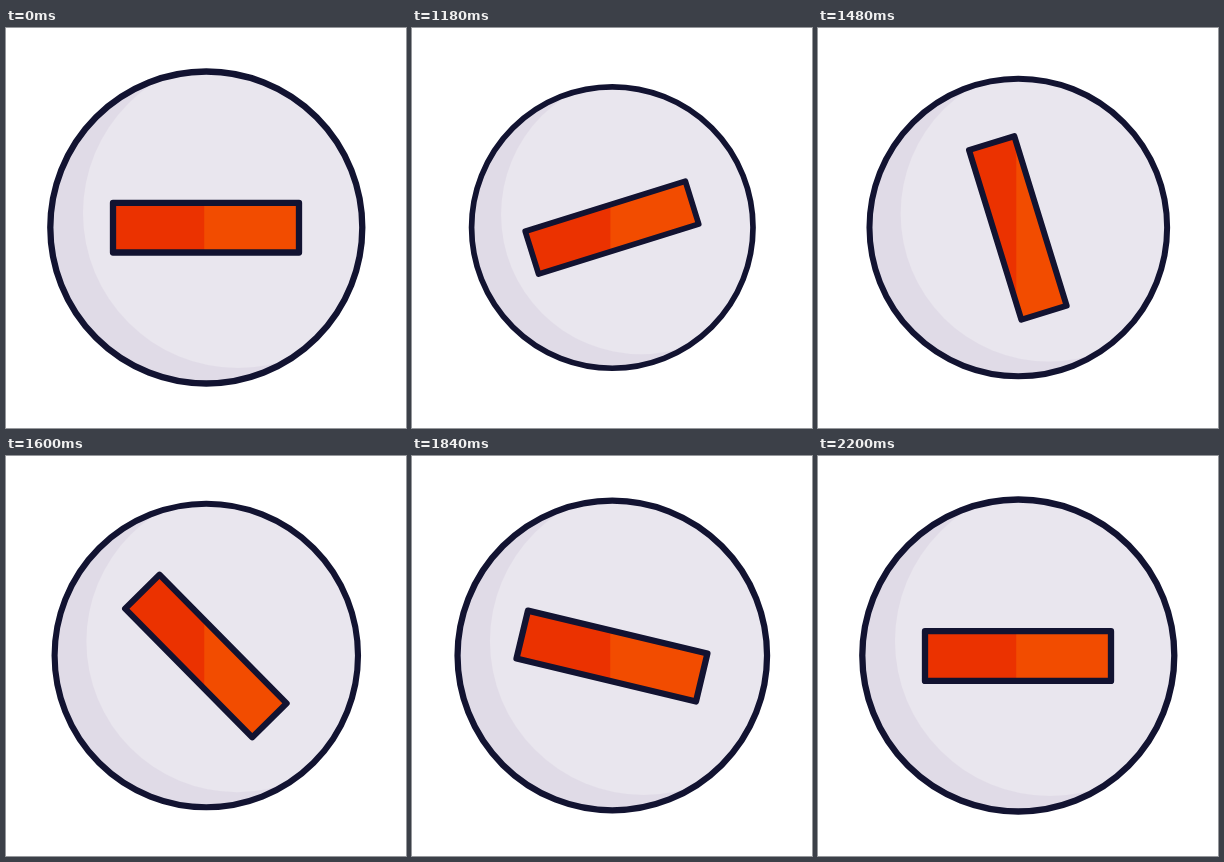
An HTML page that plays this animation: 400 px wide and 400 px high, repeating every 2230 ms.

```html
<!DOCTYPE html>
<html lang="en">
<head>
<meta charset="utf-8">
<title>Minus button</title>
<style>
  html, body { margin: 0; width: 100%; height: 100%; overflow: hidden; background: #fff; }
  svg { display: block; width: 100vw; height: 100vh; }
  .line { fill: none; stroke: #121331; stroke-width: 6.3; stroke-linejoin: round; }
</style>
</head>
<body>
<svg viewBox="0 0 400 400">
  <defs>
    <clipPath id="disc"><circle cx="200.3" cy="199.5" r="156"/></clipPath>
    <clipPath id="bar"><rect class="spin" x="107" y="174.8" width="186" height="49.7"/></clipPath>
  </defs>
  <g id="icon">
    <g clip-path="url(#disc)">
      <rect width="400" height="400" fill="#e0dbe7"/>
      <circle cx="232" cy="185" r="155" fill="#e9e6ee"/>
    </g>
    <circle class="line" cx="200.3" cy="199.5" r="156"/>
    <g clip-path="url(#bar)">
      <rect width="400" height="400" fill="#f24c00"/>
      <rect width="198.2" height="400" fill="#eb3200"/>
    </g>
    <rect class="line spin" x="107" y="174.8" width="186" height="49.7"/>
  </g>
</svg>
<script>
  const LOOP = 2230, START = 1000, STEP = 30, STEPS = 40;
  const DIP = 6, MIN_SCALE = 0.902;
  const icon = document.getElementById('icon');
  const spinners = document.querySelectorAll('.spin');

  // Cubic bezier easing with handles (x1, 0) and (x2, 1)
  const ease = (x1, x2) => u => {
    if (u <= 0) return 0;
    if (u >= 1) return 1;
    let lo = 0, hi = 1;
    for (let i = 0; i < 30; i++) {
      const s = (lo + hi) / 2, r = 1 - s;
      if (3 * r * r * s * x1 + 3 * r * s * s * x2 + s * s * s < u) lo = s;
      else hi = s;
    }
    return lo * lo * (3 - 2 * lo);
  };
  const turn = ease(0.311, 0.29);
  const shrink = ease(0.333, 0.667);
  const grow = ease(0.22, 0.19);

  function draw(time) {
    const k = Math.min(STEPS, Math.max(0, Math.floor((time - START) / STEP + 0.01)));
    const depth = k < DIP ? shrink(k / DIP) : 1 - grow((k - DIP) / (STEPS - DIP));
    const scale = 1 - (1 - MIN_SCALE) * depth;
    const angle = -180 * turn(k / STEPS);
    icon.setAttribute('transform', `translate(200.3 199.6) scale(${scale}) translate(-200.3 -199.6)`);
    for (const el of spinners) el.setAttribute('transform', `rotate(${angle} 200 199.85)`);
  }

  const origin = performance.now();
  function tick() {
    draw((performance.now() - origin) % LOOP);
    requestAnimationFrame(tick);
  }
  tick();
</script>
</body>
</html>
```
